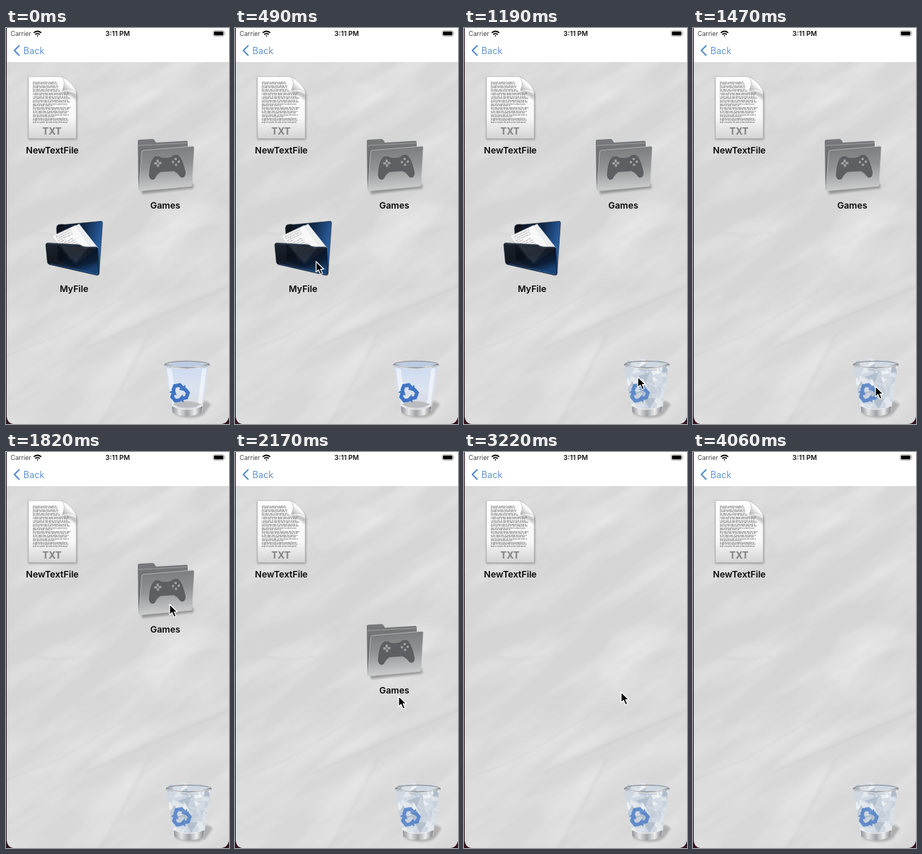
An HTML page that plays this animation: 308x546 px, repeating every 4.2 s.

```html
<!DOCTYPE html>
<html lang="en">
<head>
<meta charset="utf-8">
<title>Drag files to the bin</title>
<style>
  html, body { margin: 0; width: 100%; height: 100%; overflow: hidden; background: #32121f; }
  svg { display: block; width: 308px; height: 546px; }
  text { font-family: Inter, Roboto, sans-serif; }
  .label { font-size: 12.3px; font-weight: 600; text-anchor: middle; fill: #080808; }
  .print { font-size: 2.6px; fill: #444; }
</style>
</head>
<body>
<svg viewBox="0 0 308 546">
  <defs>
    <filter id="soft" x="-30%" y="-30%" width="160%" height="160%"><feGaussianBlur stdDeviation="3"/></filter>
    <filter id="shade" x="-30%" y="-30%" width="160%" height="160%"><feGaussianBlur stdDeviation="1.4"/></filter>
    <filter id="crinkle" x="0" y="0" width="100%" height="100%">
      <feTurbulence type="fractalNoise" baseFrequency=".007 .03" numOctaves="3" seed="4"/>
      <feColorMatrix values="0 0 0 0 1  0 0 0 0 1  0 0 0 0 1  .7 0 0 0 -.28"/>
    </filter>
    <clipPath id="screen"><path d="M1 0H308V536Q306 545 298 546H10Q2 545 1 536Z"/></clipPath>
    <clipPath id="inside"><path d="M219 464L224 459 233 460 241 456 255 458 265 457 274 460 280 464L271 526Q249 535 229 526Z"/></clipPath>
    <linearGradient id="paper" x2=".2" y2="1">
      <stop stop-color="#dadada"/><stop offset=".45" stop-color="#d5d5d5"/><stop offset="1" stop-color="#d8d8d8"/>
    </linearGradient>
    <linearGradient id="sheet" x2="0" y2="1">
      <stop stop-color="#fdfdfd"/><stop offset=".65" stop-color="#f8f8f8"/><stop offset="1" stop-color="#d4d4d4"/>
    </linearGradient>
    <linearGradient id="curl" x1="1" y1="0" x2="0" y2="1">
      <stop stop-color="#e4e4e4"/><stop offset=".5" stop-color="#fff"/><stop offset="1" stop-color="#999"/>
    </linearGradient>
    <linearGradient id="greyBack" x2="0" y2="1"><stop stop-color="#77797b"/><stop offset="1" stop-color="#5c5e60"/></linearGradient>
    <linearGradient id="greyFront" x2=".1" y2="1">
      <stop stop-color="#77787a"/><stop offset=".5" stop-color="#929395"/><stop offset="1" stop-color="#cbcccc"/>
    </linearGradient>
    <linearGradient id="navyBack" x2="1" y2=".3">
      <stop stop-color="#0b121d"/><stop offset=".6" stop-color="#12294a"/><stop offset="1" stop-color="#2a61a5"/>
    </linearGradient>
    <linearGradient id="navyFront" x2=".5" y2="1">
      <stop stop-color="#121b27"/><stop offset=".45" stop-color="#090e17"/><stop offset=".8" stop-color="#0b1b32"/><stop offset="1" stop-color="#17406f"/>
    </linearGradient>
    <linearGradient id="glass" x2="0" y2="1">
      <stop stop-color="#c9d9f2"/><stop offset=".45" stop-color="#dbe5f4"/><stop offset="1" stop-color="#d2d5d9"/>
    </linearGradient>
    <linearGradient id="metal">
      <stop stop-color="#7d8083"/><stop offset=".25" stop-color="#e8e8e8"/><stop offset=".5" stop-color="#96999c"/>
      <stop offset=".75" stop-color="#f2f2f2"/><stop offset="1" stop-color="#6c6f73"/>
    </linearGradient>
  </defs>

  <g clip-path="url(#screen)">
    <rect width="308" height="546" fill="url(#paper)"/>
    <rect x="-300" y="-100" width="900" height="800" transform="rotate(-35 154 296)" filter="url(#crinkle)"/>
    <g filter="url(#soft)" fill="#fff" fill-opacity=".13">
      <path d="M0 447L70 420 171 361 130 411 60 450 0 500Z"/>
      <path d="M130 411L220 372 308 336 308 352 200 398 110 440Z"/>
      <path d="M180 300L205 250 250 235 308 250 308 270 240 275 210 330Z"/>
      <path d="M92 100L160 72 220 88 168 110 120 140Z"/>
      <path d="M80 546L140 470 195 420 160 490 128 546Z"/>
    </g>
    <g filter="url(#shade)" fill="none" stroke="#777" stroke-opacity=".08" stroke-width="2">
      <path d="M0 452L72 424 172 364M110 442L205 400 308 356"/>
      <path d="M40 282Q70 290 110 281M130 546L163 490 198 422"/>
    </g>

    <rect width="308" height="47" fill="#fff"/>
    <text x="6.300" y="11" font-size="8.700" fill="#444">Carrier</text>
    <g fill="none" stroke="#111" stroke-width="1.700">
      <path d="M38.300 6.700Q43.500 2.300 48.700 6.700M40.300 9Q43.500 6.300 46.700 9"/>
      <path d="M42.300 10.700L43.500 9.700 44.700 10.700 43.500 12Z" fill="#111" stroke="none"/>
    </g>
    <text x="154.300" y="11" font-size="9.400" font-weight="600" text-anchor="middle" fill="#111">3:11 PM</text>
    <rect x="286" y="3.500" width="15.500" height="8" rx="2.300" fill="#fff" stroke="#aaa" stroke-width=".8"/>
    <rect x="287.200" y="4.700" width="13.100" height="5.600" rx="1.200"/>
    <path d="M302.500 6Q304 7.500 302.500 9Z" fill="#999"/>
    <path d="M18 24.500L11.500 31 18 37.500" fill="none" stroke="#5189cc" stroke-width="1.800" stroke-linecap="round" stroke-linejoin="round"/>
    <text x="24" y="35.700" font-size="12.500" fill="#6496cf">Back</text>

    <path d="M31 69H79L98 90V154H31Z" fill="#555" opacity=".5" filter="url(#shade)"/>
    <path d="M31 67H77Q82 69 97 87V152.500H31Z" fill="url(#sheet)" stroke="#aaa" stroke-width=".6"/>
    <g id="lines" class="print"></g>
    <path d="M76 88Q82 84 97 91V100Q89 90 76 89Z" fill="#777" opacity=".45" filter="url(#shade)"/>
    <path d="M77 67Q83 74 78 86Q88 82 97.500 88Q91 74 77 67Z" fill="url(#curl)" stroke="#999" stroke-width=".4"/>
    <text x="63.500" y="147" font-size="13" font-weight="700" text-anchor="middle" fill="#808080">TXT</text>

    <g class="games">
      <path d="M186 220L258 214 259 221 188 229Z" fill="#444" opacity=".45" filter="url(#shade)"/>
      <path d="M182 156Q182 154 184 154L202 153Q205 153 207 158L249 155.500Q251 155.500 251 158V210L183 223Z" fill="url(#greyBack)"/>
      <path d="M183 162L251 158.500" stroke="#a6a7a8" stroke-width=".8"/>
      <path d="M187.500 171Q187.500 169 190 168.700L258 163Q260 163 260 165L257 216Q257 218 255 218.300L186 224.500Q183 224.500 183.300 221.500Z" fill="url(#greyFront)" stroke="#c8c8c8" stroke-width=".7"/>
      <g transform="translate(0 -1.500) rotate(-4 222 192)">
        <path d="M207 178Q212 177 216 180.500Q222 182 229 180.500Q232 177 238 178Q244 181 247 203Q246 211 240 208Q236 201 231 199H213Q208 201 204 208Q198 211 197 203Q200 181 207 178Z" fill="#5d5f62" stroke="#515356" stroke-width=".7"/>
        <path d="M210 182V192M205 187H215" stroke="#a2a4a6" stroke-width="3"/>
        <path d="M210 185.500V188.500M208.500 187H211.500" stroke="#5d5f62" stroke-width="1.200"/>
        <g fill="#a2a4a6"><circle cx="235" cy="183" r="1.700"/><circle cx="235" cy="191" r="1.700"/><circle cx="231" cy="187" r="1.700"/><circle cx="239" cy="187" r="1.700"/></g>
      </g>
    </g>

    <g class="myfile">
      <path d="M70 279Q69 271 74 271L82 271 104 269 131 266.500Q133.500 266 133.300 269L128.500 338 120 338 72 321Z" fill="url(#navyBack)" stroke="#0b1524" stroke-width=".6"/>
      <path d="M71 276Q73 269 80 271L79 281 70 282Z" fill="#10151d"/>
      <path d="M72 286L101 270 127 303 97 325Z" fill="#eceef0"/>
      <path d="M64 287L96 272 118 304 88 320Z" fill="#f8f8f8" stroke="#cdd0d4" stroke-width=".4"/>
      <g id="memo" class="print" fill-opacity=".7" transform="translate(69 289) rotate(-26)"></g>
      <path d="M55 299Q55 296.500 58 296.500L102 299Q106 302 110 302L124 302Q126.500 302 126.700 304L128.500 338Q128.500 341.500 125 340.700L60 326Q57.500 325 57.300 323Z" fill="url(#navyFront)" fill-opacity=".95" stroke="#0a1424" stroke-width=".7"/>
      <path d="M75 299L114 303 95 325Z" fill="#b7c7d8" opacity=".1"/>
      <path d="M57 297.500L102 300Q106 303 110 303H125" fill="none" stroke="#5b7896" stroke-width=".7" opacity=".6"/>
      <path d="M61 325L126 339.500" stroke="#2b6ab0" stroke-width=".8" opacity=".7"/>
    </g>

    <g id="bin">
      <path d="M230 531Q254 543 273 533L283 519 276 514Z" fill="#555" opacity=".35" filter="url(#shade)"/>
      <path d="M219.500 465L229 529Q249 540 271 529L280 465Z" fill="url(#glass)" fill-opacity=".85"/>
      <g id="empty">
        <ellipse cx="249.500" cy="464" rx="29" ry="4" fill="#bccbe2"/>
        <path d="M222 469L230 522 236 525 229 470Z" fill="#fff" opacity=".55"/>
        <path d="M271 470L264 525 270 522 277 469Z" fill="#fff" opacity=".55"/>
        <path d="M230 519Q250 510 270 519Q250 528 230 519Z" fill="#b9bbbd"/>
      </g>
      <g id="full" clip-path="url(#inside)"></g>
      <g id="recycle"></g>
      <path d="M229 521Q249 530 271.500 521L270 530Q250 541 230 530Z" fill="url(#metal)" opacity=".85"/>
      <path d="M229 521Q249 531 271.500 521" fill="none" stroke="#eee" stroke-width="1"/>
      <path d="M219 464Q250 474 281 464" fill="none" stroke="url(#metal)" stroke-width="2.600"/>
      <ellipse cx="250" cy="464" rx="31" ry="4.600" fill="none" stroke="#8d9196" stroke-width="1.200"/>
      <path d="M219.500 465Q250 475 280.500 465" fill="none" stroke="#f5f5f5" stroke-width=".8"/>
    </g>

    <text class="label" x="64" y="173">NewTextFile</text>
    <text class="label games" x="220" y="248.500">Games</text>
    <text class="label myfile" x="94" y="363.500">MyFile</text>

    <g id="cursor">
      <g id="ring" fill="none">
        <circle cx="1" cy="2" r="20" stroke="#fff" stroke-width="5.400"/>
        <circle cx="1" cy="2" r="20" stroke="#080808" stroke-width="3.200"/>
      </g>
      <path d="M0 0V14.500L3.400 11.500 6 17.500 8.800 16.300 6.200 10.500H10.700Z" fill="#000" stroke="#fff" stroke-width="1.200" stroke-linejoin="round"/>
    </g>
  </g>
</svg>
<script>
const LOOP = 4200, STEP = 70;
const $ = id => document.getElementById(id);

let seed = 7;
const rnd = () => (seed = seed * 16807 % 2147483647) / 2147483647;
const span = (a, b) => a + (b - a) * rnd();

function add(parent, tag, attrs, text = '') {
  const el = document.createElementNS('http://www.w3.org/2000/svg', tag);
  for (const k in attrs) el.setAttribute(k, attrs[k]);
  el.textContent = text;
  parent.append(el);
}

// Fine print on the document and the memo
const words = 'the note is kept in a plain file with some lines about work and rest for each day of this week '.repeat(3);
function print(parent, x, y, rows, gap, length) {
  for (let i = 0; i < rows; i++) {
    const from = Math.floor(rnd() * 95);
    add(parent, 'text', { x, y: y + i * gap }, words.slice(from, from + length(i)));
  }
}
print($('lines'), 37, 75.5, 23, 2.5, i => i === 13 || i === 19 ? 24 : i < 6 ? 30 : 42);
print($('memo'), 0, 0, 8, 3, i => i === 3 ? 9 : 19);

// Crumpled sheets
const tints = ['#f3f5f7', '#dfe5ec', '#c3cdd9', '#adb9c8', '#e9edf1', '#d0d8e2'];
add($('full'), 'rect', { x: 218, y: 455, width: 66, height: 80, fill: '#cfd8e2' });
for (let i = 0; i < 60; i++) {
  const x = span(222, 280), y = 459 + i * 1.1, turn = span(0, 6.3);
  const points = [0, 1, 2].map(k => {
    const r = span(5, 12), a = turn + k * 2.1;
    return `${x + r * Math.cos(a)},${y + r * Math.sin(a)}`;
  }).join(' ');
  add($('full'), 'polygon', { points, fill: tints[Math.floor(rnd() * 6)], opacity: .8 });
}

// Three bent arrows chasing each other
for (let i = 0; i < 3; i++) {
  const transform = `translate(239.500 503.500) rotate(${i * 120 - 10})`;
  add($('recycle'), 'path', { d: 'M-8 -5L-4.500 -11H2.500L5 -7', fill: 'none', stroke: '#3f74c4', 'stroke-width': 5, transform });
  add($('recycle'), 'path', { d: 'M0 -5L10 -10 9 -1Z', fill: '#3f74c4', transform });
}

// time, x, y of the pointer tip
const path = [
  [70, 226, 530], [280, 190, 420], [490, 112, 322], [630, 100, 310],
  [700, 112, 345], [770, 135, 399], [840, 184, 444], [910, 222, 470],
  [980, 240, 481], [1260, 240, 481], [1470, 252, 494], [1680, 262, 503],
  [1750, 246, 350], [1820, 226, 210], [1960, 226, 210], [2380, 226, 463],
  [2450, 226, 471], [2520, 232, 490], [2660, 290, 522], [2940, 226, 478],
  [3150, 226, 478], [3220, 217, 331], [3430, 160, 150], [3710, 69, 34],
  [3780, 72, 110], [3990, 144, 512]
];

function tip(t) {
  const i = path.findIndex(k => k[0] >= t);
  if (i < 0) return path[path.length - 1].slice(1);
  if (i === 0) return path[0].slice(1);
  const [t0, x0, y0] = path[i - 1], [t1, x1, y1] = path[i];
  const p = (t - t0) / (t1 - t0);
  return [x0 + (x1 - x0) * p, y0 + (y1 - y0) * p];
}

// A dragged icon trails the pointer by one step, snaps home, then goes.
const drags = [
  { name: 'myfile', grab: 630, drop: 1050, hide: 1330 },
  { name: 'games', grab: 1960, drop: 2590, hide: 2730 }
];
for (const d of drags) d.parts = document.querySelectorAll('.' + d.name);

function drag({ parts, grab, drop, hide }, t) {
  const [x0, y0] = tip(grab), [x, y] = tip(t - STEP);
  const held = t > grab && t < drop;
  const move = held ? `translate(${x - x0} ${y - y0})` : '';
  const alpha = Math.min(1, Math.max(0, 1 - (t - hide) / 140));
  parts.forEach(el => {
    el.setAttribute('transform', move);
    el.style.opacity = alpha;
  });
}

const show = (id, on) => { $(id).style.display = on ? '' : 'none'; };

function draw(now) {
  const t = Math.floor(now % LOOP / STEP) * STEP;
  drags.forEach(d => drag(d, t));
  const full = t >= drags[0].drop;
  show('full', full);
  show('empty', !full);
  $('recycle').style.opacity = full ? .75 : 1;
  $('bin').setAttribute('transform', full ? 'translate(2.5 0)' : '');
  $('cursor').setAttribute('transform', `translate(${tip(t)})`);
  show('cursor', t >= 70 && t < 4060);
  show('ring', t >= 630 && t < 910);
}

const start = performance.now();
function frame() {
  draw(performance.now() - start);
  requestAnimationFrame(frame);
}
frame();
</script>
</body>
</html>
```
